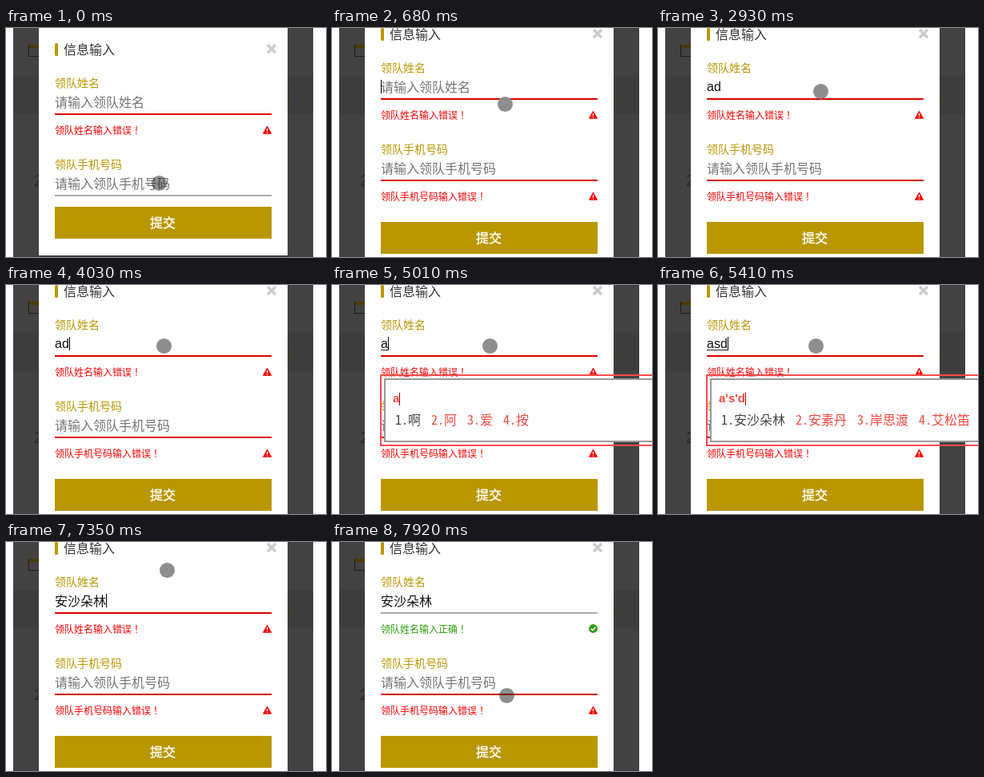
These frames come from a looping animation (400 px wide and 287 px high, 8000 ms). An HTML page:

```html
<!DOCTYPE html>
<html lang="zh-CN">
<head>
<meta charset="utf-8">
<style>
html, body { margin: 0; width: 100%; height: 100%; overflow: hidden; background: #fff; }
svg { display: block; width: 400px; height: 287px; }
text { font-family: "Liberation Sans", "Noto Sans CJK SC", "Noto Sans CJK", sans-serif; font-size: 16px; white-space: pre; }
.label { font-size: 14px; fill: #b99700; }
.hint { fill: #757575; }
.note { font-size: 12px; }
.keys { font-size: 15px; font-weight: bold; fill: #f0483e; }
.cand { font-family: "Noto Sans Mono CJK SC", "Noto Sans CJK SC", "Noto Sans CJK", monospace; font-weight: 300; fill: #f0483e; }
</style>
</head>
<body>
<svg viewBox="0 0 400 287">
  <defs>
    <g id="warn">
      <path d="M326.5 123.2L331.5 132.3H321.5Z" fill="red" stroke="red" stroke-linejoin="round"/>
      <path d="M326.5 126V129.3M326.5 130.4V131.7" stroke="#fff" stroke-width="1.4"/>
    </g>
  </defs>

  <!-- dimmed page -->
  <rect x="9" width="375" height="287" fill="#424242"/>
  <rect x="9" y="60" width="375" height="48" fill="#3d3d3d"/>
  <rect x="28.5" y="21.5" width="16" height="14" fill="none" stroke="#1c1c1c"/>
  <rect x="29" y="21" width="16" height="4" fill="#4a3c00"/>
  <text x="35" y="198" style="font-size:20px" fill="#2a2a2a">2</text>
  <text x="339" y="92" fill="#4a3c00">示</text>

  <g id="dialog">
    <rect id="panel" x="41" y="-10" width="311" fill="#fff"/>
    <rect x="61" y="19" width="4" height="16" rx="1.5" fill="#b99700"/>
    <text x="72" y="33" fill="#333">信息输入</text>
    <path d="M327 21L337 31M337 21L327 31" stroke="#ccc" stroke-width="3.4"/>

    <text class="label" x="61" y="74">领队姓名</text>
    <text id="name" x="61" y="99"></text>
    <path id="under" stroke="#222"/>
    <rect id="nameLine" x="61" y="107" width="271" height="2"/>
    <text id="nameNote" class="note" x="61" y="133">领队姓名输入<tspan id="verdict"></tspan><tspan dx="3">！</tspan></text>
    <use id="nameBad" href="#warn"/>
    <g id="nameGood">
      <circle cx="326.5" cy="127.5" r="5.4" fill="#2a9d08"/>
      <path d="M323.8 127.6L325.9 129.7L329.4 125.8" fill="none" stroke="#fff" stroke-width="1.6"/>
    </g>

    <text class="label" x="61" y="176">领队手机号码</text>
    <text class="hint" x="61" y="201">请输入领队手机号码</text>
    <rect id="phoneLine" x="61" y="209" width="271" height="2"/>
    <g id="phoneBad">
      <text class="note" x="61" y="235" fill="red">领队手机号码输入错误<tspan dx="3">！</tspan></text>
      <use href="#warn" y="102"/>
    </g>
    <g id="button">
      <rect x="61" y="224" width="271" height="40" fill="#b99700"/>
      <text x="196" y="250" text-anchor="middle" fill="#fff" stroke="#fff" stroke-width=".4">提交</text>
    </g>
    <rect id="caret" width="1" height="17" fill="#000"/>
  </g>

  <g id="ime">
    <rect x="61" y="113" width="360" height="88" fill="none" stroke="#ff4a4a" stroke-width="2"/>
    <rect x="66" y="118" width="360" height="78" fill="#fff" stroke="#999" stroke-width="2"/>
    <text id="keys" class="keys" x="76" y="147"></text>
    <rect id="keyCaret" y="135" width="1" height="16" fill="#a00"/>
    <g id="cands"></g>
  </g>

  <circle id="mouse" r="9.5"/>
</svg>
<script>
const LOOP = 8000, BLINK = 530, STEP = 135;
const FAIL = 680, CLICK = 4030, COMPOSE = 5010, COMMIT = 5850, VALID = 7790;
const RED = '#d80000', GREY = '#adadad', GREEN = '#2a9d08';

// Pointer moves: start time, number of steps, end point.
const moves = [
  [130, 3, 216, 95], [1140, 3, 203, 79], [3330, 2, 218, 31],
  [3600, 2, 198, 79], [CLICK, 1, 197, 76], [6110, 3, 198, 52],
  [6960, 3, 201, 35], [7360, 5, 218, 192]
];
const typed = [
  [0, ''], [2120, 'a'], [2370, 'ad'], [4460, 'a'], [4580, ''],
  [COMPOSE, 'a'], [5270, 'as'], [5410, 'asd'], [COMMIT, '安沙朵林']
];
const choices = {
  a: ['啊', '阿', '爱', '按'],
  as: ['按时', '暗示', '爱上', '按上'],
  asd: ['安沙朵林', '安素丹', '岸思渡', '艾松笛']
};
// The caret restarts its blink on focus, click and key press.
const wakes = [270, FAIL, CLICK, ...typed.slice(1).map(k => k[0])];

const $ = id => document.getElementById(id);
const show = (id, on) => $(id).setAttribute('visibility', on ? 'visible' : 'hidden');
const set = (id, attrs) => { for (const k in attrs) $(id).setAttribute(k, attrs[k]); };
const ease = p => p * p * (3 - 2 * p);

function pointer(t) {
  let x = 191, y = 194;
  for (const [start, steps, toX, toY] of moves) {
    if (t < start) break;
    const p = ease(Math.min(1, (Math.floor((t - start) / STEP) + 1) / steps));
    x += (toX - x) * p;
    y += (toY - y) * p;
  }
  return [Math.round(x) + .5, Math.round(y) + .5];
}

function caretOn(t) {
  const last = Math.max(...wakes.filter(w => w <= t));
  return t < VALID && Math.floor((t - last) / BLINK) % 2 === 0;
}

function drawIme(word) {
  $('keys').textContent = [...word].join("'");
  set('keyCaret', { x: Math.round(76 + $('keys').getComputedTextLength()) });
  $('cands').textContent = '';
  let x = 79;
  choices[word].forEach((c, i) => {
    const el = document.createElementNS('http://www.w3.org/2000/svg', 'text');
    el.setAttribute('class', 'cand');
    el.setAttribute('x', x);
    el.setAttribute('y', 175);
    if (!i) el.style.fill = '#444';
    el.textContent = `${i + 1}.${c}`;
    $('cands').append(el);
    x += 16 * c.length + 29;
  });
}

function draw(t) {
  const failed = t >= FAIL, valid = t >= VALID;
  const composing = t >= COMPOSE && t < COMMIT;
  const word = typed.filter(k => k[0] <= t).pop()[1];

  set('dialog', { transform: `translate(0 ${failed ? -19 : 0})` });
  set('panel', { height: failed ? 330 : 295 });
  set('button', { transform: `translate(0 ${failed ? 38 : 0})` });

  $('name').textContent = word || '请输入领队姓名';
  set('name', { fill: word ? '#111' : '#757575', y: word && word < '~' ? 98 : 99 });
  const end = 61 + (word ? Math.round($('name').getComputedTextLength()) : 0);
  set('under', { d: `M61 100.5H${end}` });
  show('under', composing);
  set('caret', { x: end, y: failed ? 84 : 186 });
  show('caret', caretOn(t));

  set('nameLine', { fill: valid ? GREY : RED });
  $('verdict').textContent = valid ? '正确' : '错误';
  set('nameNote', { fill: valid ? GREEN : 'red' });
  show('nameBad', !valid);
  show('nameGood', valid);
  set('phoneLine', { fill: failed ? RED : GREY });
  show('phoneBad', failed);

  show('ime', composing);
  if (composing) drawIme(word);

  // The pointer turns translucent while pressed on the phone field.
  const [cx, cy] = pointer(t);
  set('mouse', { cx, cy, fill: cy > 180 ? 'rgba(30,30,30,.5)' : '#8e8e8e' });
}

const start = performance.now();
function tick() {
  draw((performance.now() - start) % LOOP);
  requestAnimationFrame(tick);
}
tick();
</script>
</body>
</html>
```
